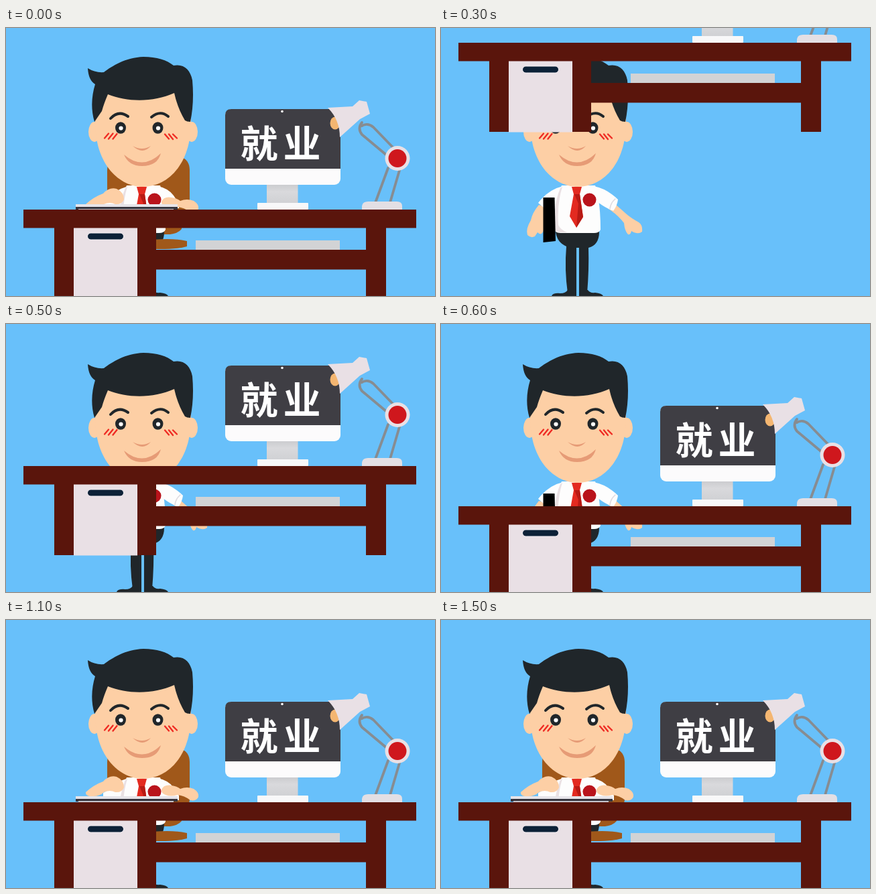
Animation, 640 px wide and 400 px high, one loop 2500 ms. Source, as an HTML page:

```html
<!DOCTYPE html>
<html lang="zh">
<head>
<meta charset="utf-8">
<title>Desk</title>
<style>
  html, body { margin: 0; width: 100%; height: 100%; overflow: hidden; background: #68c0fa; }
  svg { display: block; width: 640px; height: 400px; }
  .skin { fill: #fdcfa5; }
  .dark { fill: #20262a; }
  .wood { fill: #5a150c; }
  .white { fill: #fdfdfd; }
  .chair { fill: #a0581a; }
  .pale { fill: #e9e0e5; }
  .line { fill: none; stroke-linecap: round; stroke-linejoin: round; }
  .screen { font: 900 56px "Noto Sans CJK SC", "Noto Sans CJK JP", "Noto Sans CJK", sans-serif; fill: #fff; text-anchor: middle; }
</style>
</head>
<body>
<svg viewBox="0 0 640 400">
  <defs>
    <linearGradient id="neck" x2="0" y2="1">
      <stop offset="0" stop-color="#c9cacd"/>
      <stop offset="0.4" stop-color="#d9d9dc"/>
      <stop offset="1" stop-color="#cfd0d3"/>
    </linearGradient>
  </defs>
  <rect width="640" height="400" fill="#68c0fa"/>

  <g id="chair" class="chair">
    <rect x="151" y="194" width="123" height="90" rx="12" ry="18"/>
    <path d="M200 290H262V300Q256 308 240 308H200Z"/>
  </g>

  <!-- trousers and shoes -->
  <g class="dark">
    <path d="M171 304H236Q236 324 220 328Q221 360 218 396H206V328H202V396H189Q184 360 187 326Q173 320 171 304Z"/>
    <path d="M165 400Q167 395 178 396Q186 396 189 391H202V400Z"/>
    <path d="M206 400V391H219Q222 396 230 395Q240 396 242 400Z"/>
  </g>
  <path id="chairBase" class="chair" d="M200 318Q245 312 270 318V326Q250 332 200 329Z"/>

  <g id="standArms">
    <path class="skin" d="M146 264Q136 276 134 287Q126 300 129 309Q134 314 140 311L144 305Q150 311 153 302V266Z"/>
    <path class="skin" d="M250 270Q264 279 273 291Q274 303 279 308Q283 309 284 303Q294 309 300 304Q301 294 295 290Q284 284 277 278L260 263Z"/>
    <path class="white" d="M182 236Q160 241 145 261L153 268L174 272L184 250Z"/>
    <path class="white" d="M228 236Q248 240 264 256Q263 265 257 273Q246 269 234 260Z"/>
    <path class="line" d="M260 255Q253 261 252 270" stroke="#dedbe0" stroke-width="1.5"/>
  </g>

  <g id="sitSleeves" class="white">
    <path d="M184 236Q165 240 160 250L145 258V267H190Z"/>
    <path d="M226 236Q242 239 250 250L258 262V269H220Z"/>
  </g>

  <!-- torso -->
  <path class="white" d="M180 235H230Q238 258 238 301Q236 306 228 306H178Q169 306 169 299Q168 262 180 235Z"/>
  <path d="M181 237Q173 262 175 294Q178 301 188 305H178Q169 305 169 298Q168 262 178 239Z" fill="#e9e0e3"/>
  <path d="M195 237H210L207 248L212 282L202 298L192 281L198 248Z" fill="#e32a20"/>
  <path d="M207 248L212 282L202 298L205 262L199 248Z" fill="#b81a14"/>
  <circle cx="221.500" cy="256.500" r="10" fill="#b9131b"/>
  <path id="bag" d="M152.500 253H169.500L171 318L152.500 320Z" fill="#000"/>

  <!-- head -->
  <g class="skin">
    <ellipse cx="132" cy="155" rx="9" ry="15"/>
    <ellipse cx="277" cy="155" rx="9" ry="15"/>
    <path d="M133 90V140C133 205 170 237 204 237C240 237 276 205 276 140V90Z"/>
  </g>
  <path class="dark" d="M122 60Q133 67 146 66C158 57 178 44 205 43C225 43 240 48 250 56C265 53 275 62 278 78C280 100 279 122 275 140Q270 140 267 138Q256 120 251 97C220 111 182 111 152 99Q146 113 143 124L132 140C126 120 128 100 133 84Q123 78 122 60Z"/>
  <g class="line" stroke="#20262a" stroke-width="4">
    <path d="M156 135Q168 122 182 132"/>
    <path d="M217 133Q230 122 242 132"/>
  </g>
  <g class="dark">
    <ellipse cx="171" cy="149" rx="8" ry="8.800"/>
    <ellipse cx="226.500" cy="149" rx="8" ry="8.800"/>
  </g>
  <g fill="#fff">
    <circle cx="171.500" cy="149.500" r="3.100"/>
    <circle cx="227" cy="149.500" r="3.100"/>
  </g>
  <g class="line" stroke="#ef2a22" stroke-width="2.300">
    <path d="M147 164.500L153 157.500M153 165.500L159.500 157.500M159.500 165.500L165.500 158"/>
    <path d="M237 158.500L243 165.500M243 158.500L249 166M249 158.500L255 164.500"/>
  </g>
  <g fill="#e69b76">
    <path d="M189 176Q203 184 216 176Q204 190 189 176Z"/>
    <path d="M176 189Q204 213 231 187Q226 206 203 206Q183 206 176 189Z"/>
  </g>

  <!-- seated hands and laptop -->
  <g id="hands" class="skin">
    <path d="M119 257Q131 246 145 241Q154 231 165 234Q176 239 176 250Q173 258 163 257Q155 253 146 257Q140 263 130 263Q118 264 119 257Z"/>
    <path d="M232 253Q236 245 247 247Q255 248 260 252Q270 248 280 252Q288 257 287 264Q284 271 275 269Q266 262 256 261Q246 264 238 261Q231 258 232 253Z"/>
  </g>
  <g id="laptop">
    <path d="M104 263H256V268H104Z" fill="#e6e4e9"/>
    <path d="M104 267H256V271H104Z" fill="#35343d"/>
    <path d="M108 270H250V272H108Z" fill="#c8c6cd"/>
  </g>

  <g id="desk"><g transform="translate(0 -272)">
    <path class="wood" d="M26 272H612V299.500H567V405H537V361.500H224V405H72V299.500H26ZM224 299.500V332H537V299.500Z" fill-rule="evenodd"/>
    <rect class="pale" x="101" y="299.500" width="95" height="106"/>
    <rect x="121.500" y="307" width="54" height="10" rx="5" fill="#0c2137" stroke="#f6f1f5"/>
    <rect x="283" y="318" width="215" height="14" fill="#d2d3d5"/>

    <!-- monitor -->
    <rect x="389" y="233" width="46.500" height="31" fill="url(#neck)"/>
    <rect x="375" y="262" width="76" height="10" rx="1" fill="#f8f8f9"/>
    <rect x="327" y="122" width="172" height="113" rx="9" fill="#fcfbfc"/>
    <path d="M327 211V131Q327 122 336 122H490Q499 122 499 131V211Z" fill="#3f3e44"/>
    <circle cx="412" cy="125.500" r="1.800" fill="#fff"/>
    <text class="screen" x="377.500" y="194">就</text>
    <text class="screen" x="441.500" y="194">业</text>

    <!-- lamp -->
    <g class="line" stroke="#878c91" stroke-width="3.800">
      <path d="M531 142Q524 151 531 160L568 191"/>
      <path d="M531 147Q540 142 548 149L577 179"/>
      <path d="M570 210L550.500 263M588 210L572.500 263"/>
    </g>
    <ellipse cx="491" cy="143" rx="7.500" ry="9.500" fill="#f4b671"/>
    <path class="pale" d="M480 120L517 118L527 109L538 111L543 129L528 137L498 164Q498 138 480 120Z"/>
    <circle class="pale" cx="584" cy="195.500" r="18.500"/>
    <circle cx="584" cy="195.500" r="13.500" fill="#cf171d"/>
    <path d="M531 272V267Q532 260 540 260H583Q591 260 591 267V272Z" fill="#e3dfe4"/>
  </g></g>
</svg>
<script>
const LOOP = 2500;

// Each step is [time in ms, value], held until the next one.
function play(id, prop, steps) {
  const frames = steps.map(([t, v]) => ({ offset: t / LOOP, [prop]: v, easing: "step-end" }));
  frames.push({ offset: 1, [prop]: steps[steps.length - 1][1] });
  document.getElementById(id).animate(frames, { duration: LOOP, iterations: Infinity });
}

const show = on => on ? "visible" : "hidden";
const moveY = y => `translateY(${y}px)`;
const STAND = 100, SIT = 700, REST = 1500;

for (const id of ["standArms", "bag"])
  play(id, "visibility", [[0, show(false)], [STAND, show(true)], [SIT, show(false)]]);
for (const id of ["chair", "chairBase", "sitSleeves", "hands", "laptop"])
  play(id, "visibility", [[0, show(true)], [STAND, show(false)], [SIT, show(true)]]);

// The desk drops 95 px per step until it lands.
const drop = [[0, moveY(271)]];
for (let t = STAND; t <= 600; t += 100) drop.push([t, moveY(Math.min(272, -168 + 0.95 * (t - STAND)))]);
play("desk", "transform", drop);

// The hands bob while typing, then rest raised.
const typing = [[0, moveY(6)]];
for (let t = SIT, up = true; t <= REST; t += 100, up = !up) typing.push([t, moveY(up ? 0 : 6)]);
play("hands", "transform", typing);
</script>
</body>
</html>
```
